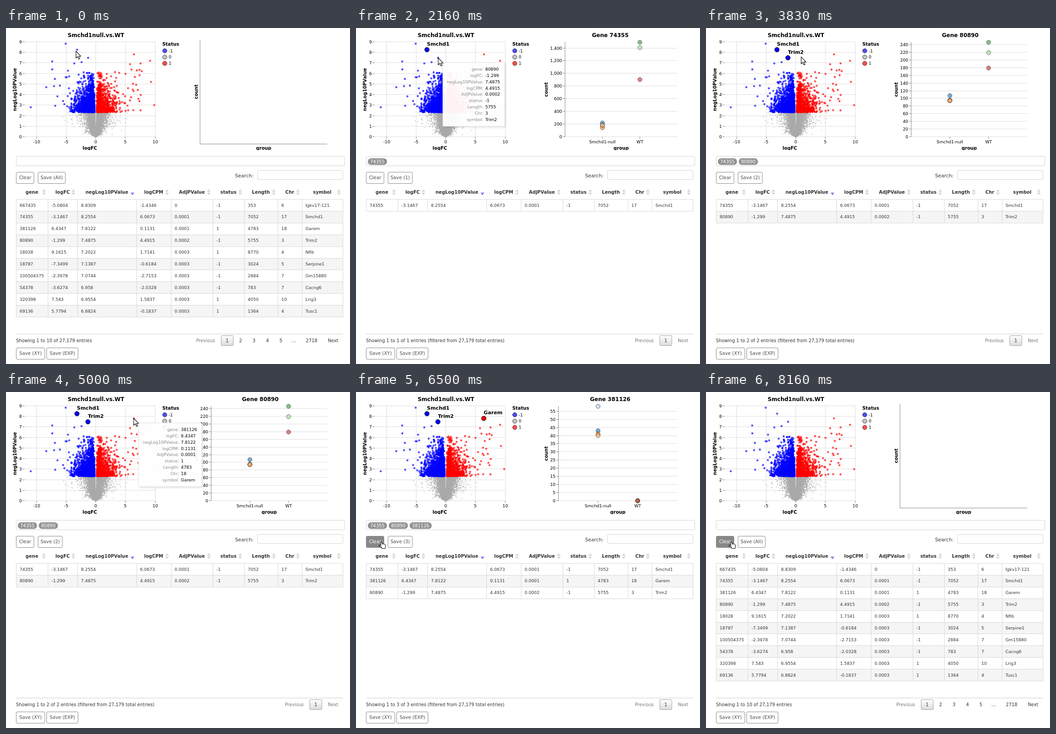
These frames come from a looping animation (757 px wide and 740 px high, 8330 ms). An HTML page with a canvas:

```html
<!DOCTYPE html>
<html lang="en">
<head>
<meta charset="utf-8">
<title>Volcano plot explorer</title>
<style>
html, body { margin: 0; width: 100%; height: 100%; overflow: hidden; background: #fff; }
canvas, svg { position: absolute; left: 0; top: 0; width: 757px; height: 740px; }
text { font-family: "DejaVu Sans", sans-serif; white-space: pre; }
#tip rect { filter: drop-shadow(2px 2px 2px rgba(0, 0, 0, .12)); }
</style>
</head>
<body>
<canvas id="dots" width="757" height="740"></canvas>
<svg viewBox="0 0 757 740">
  <defs>
    <linearGradient id="page" x2="0" y2="1"><stop stop-color="#fff"/><stop offset="1" stop-color="#dcdcdc"/></linearGradient>
  </defs>
  <g id="frame"></g>
  <g id="view"></g>
  <g id="clear"></g>
  <g id="tip"></g>
  <g id="arrow"><path d="M0 0V15.2L3.5 12L6 17.6L8.5 16.5L6.1 11.2H10.6Z" fill="#fff" stroke="#000" stroke-width="1.1"/></g>
  <g id="hand"><path d="M.5 1.5Q1.5-.5 3.3 1L5 5Q9 3.500 11.600 7L12 10.500L10.800 14.800H4.300L2.500 11.500L-2.500 8.800Q-2.500 7 0 7.500L2 8Z" fill="#fff" stroke="#000" stroke-width="1.1"/></g>
</svg>
<script>
const LOOP = 8330, STEP = 1000 / 6;
const $ = id => document.getElementById(id);

const COLS = ['gene', 'logFC', 'negLog10PValue', 'logCPM', 'AdjPValue', 'status', 'Length', 'Chr', 'symbol'];
const EDGES = [22, 92, 157, 287, 363, 455, 524, 598, 651, 741];
const GENES = `667435 -5.0804 8.8309 -1.4346 0 -1 353 6 Igkv17-121
74355 -3.1467 8.2554 6.0673 0.0001 -1 7052 17 Smchd1
381126 6.4347 7.8122 0.1131 0.0001 1 4783 18 Garem
80890 -1.299 7.4875 4.4915 0.0002 -1 5755 3 Trim2
18028 9.1615 7.2022 1.7141 0.0003 1 8770 4 Nfib
18787 -7.3499 7.1387 -0.6184 0.0003 -1 3024 5 Serpine1
100504375 -2.3978 7.0744 -2.7153 0.0003 -1 2884 7 Gm15880
54378 -3.6274 6.958 -2.0328 0.0003 -1 783 7 Cacng6
320398 7.543 6.9554 1.5837 0.0003 1 4050 10 Lrig3
69136 5.7794 6.8824 -0.1837 0.0003 1 1364 4 Tusc1
434401 0.6494 4.3982 5.6908 0.0037 1 387 9 Gm5616`.split('\n').map(l => l.split(' '));
const geneRow = id => GENES.find(g => g[0] === id);

// Four samples of the first group, then three of the second
const SAMPLES = ['#1f77b4', '#aec7e8', '#ff7f0e', '#ffbb78', '#2ca02c', '#98df8a', '#d62728'];
const CHARTS = {
  74355: { x: 460, step: 200, counts: [218, 184, 143, 181, 1490, 1405, 902] },
  80890: { x: 451.5, step: 20, counts: [107, 95, 94, 94, 246, 219, 179] },
  381126: { x: 445.5, step: 5, counts: [43, 58, 41, 40, 0, 0, 0] }
};

// Timeline: [ms, ...]; the cursor moves linearly between its keys
const CURSOR = [[0, 154, 51], [1500, 155, 50], [2160, 181, 66], [3500, 181, 66], [4660, 281, 58],
  [5660, 281, 58], [5830, 205, 135], [6000, 153, 205], [6500, 53, 330]];
const PICKED = [[0, []], [1330, ['74355']], [2660, ['74355', '80890']], [5330, ['74355', '80890', '381126']], [7160, []]];
const TIPS = [[0, null], [160, ['74355', 165, 60]], [1330, null], [2160, ['80890', 191, 76]], [2660, null],
  [4660, ['381126', 291.5, 68]], [5330, null], [5830, ['434401', 215.5, 145.5]], [6160, null]];
const HOVER = 6500;

const px = v => 197.6 + v * 13.05;
const py = v => 239.5 - v * 23.22;
const crisp = v => Math.floor(v) + .5;

function text(s, x, y, { size = 10, anchor = 'start', fill = '#333', bold, turn } = {}) {
  const rot = turn ? ` transform="rotate(-90 ${x} ${y})"` : '';
  return `<text x="${x}" y="${y + size * .36}" font-size="${size}" text-anchor="${anchor}" fill="${fill}"` +
    `${bold ? ' font-weight="700"' : ''}${rot}>${s}</text>`;
}
const mid = (s, x, y, o) => text(s, x, y, { anchor: 'middle', ...o });
const title = (s, x, y, size, turn) => mid(s, x, y, { size, turn, bold: true, fill: '#000' });
const label = (s, x, y, anchor) => text(s, x, y, { size: 9.3, anchor, fill: '#000' });
const line = (x1, y1, x2, y2, c) => `<path d="M${x1} ${y1}L${x2} ${y2}" stroke="${c}"/>`;
const box = (x, y, w, h, fill, stroke, r = 0) =>
  `<rect x="${x}" y="${y}" width="${w}" height="${h}" rx="${r}" fill="${fill}" stroke="${stroke}"/>`;
const disc = (x, y, r, fill, extra = '') => `<circle cx="${x}" cy="${y}" r="${r}" fill="${fill}" stroke="#000" ${extra}/>`;
const button = (s, x, y, w, hot) => box(x, y, w, 25, hot ? '#888' : '#fff', '#888', 2.5) +
  mid(s, x + w / 2, y + 12.3, { size: 10.2, fill: hot ? '#fff' : '#4c4c4c' });

function random(seed) {
  return () => (seed = (seed * 1664525 + 1013904223) % 4294967296) / 4294967296;
}

function drawDots() {
  const c = $('dots').getContext('2d'), rnd = random(77);
  const gauss = () => Math.sqrt(-2 * Math.log(1 - rnd())) * Math.cos(6.2832 * rnd());
  // Effect size that goes with a significance v: z score times a log-normal error
  const effect = (v, se, spread) => (Math.sqrt(.0424 + .868 * v) - .206) / .434 * se * Math.exp(spread * gauss());
  const dot = (x, v, r = 2.3) => { c.beginPath(); c.arc(px(x), py(v), r, 0, 7); c.fill(); };

  c.strokeStyle = '#ddd';
  c.beginPath();
  for (let v = -10; v <= 10; v += 5) { c.moveTo(crisp(px(v)), 30.5); c.lineTo(crisp(px(v)), 239.5); }
  for (let v = 0; v <= 9; v++) { c.moveTo(41, crisp(py(v))); c.lineTo(328, crisp(py(v))); }
  c.stroke();

  c.fillStyle = '#aaa';
  for (let i = 0; i < 9000; i++) {
    const v = 2.29 * Math.pow(rnd(), 1.25);
    const x = Math.max(effect(v, .24, .72), v > 1.4 ? .1 : 0);
    if (x < 9.6) dot(rnd() < .5 ? -x : x, v, .85);
  }

  const cloud = (n, side, se, spread, mean) => {
    while (n) {
      const v = 2.33 - mean * Math.log(1 - rnd());
      const x = Math.max(effect(v, se, spread), .2);
      if (v > 6.1 || x > 5.6 - v * .4) continue;
      dot(side * x, v);
      n--;
    }
  };
  const strays = (n, side, reach, bend) => {
    while (n--) dot(side * (2 + reach * Math.pow(rnd(), bend)), 2.4 + 4.2 * Math.pow(rnd(), 1.2));
  };
  const known = side => GENES.slice(0, 10).filter(g => g[5] == side).forEach(g => dot(+g[1], +g[2]));

  c.globalAlpha = .68;
  c.fillStyle = '#00f';
  cloud(950, -1, .19, .45, 1);
  cloud(650, -1, .62, .48, .62);
  strays(45, -1, 5.5, 2.4);
  known(-1);
  dot(-10.97, 2.8);
  dot(-8.35, 4.7);
  c.fillStyle = '#f00';
  cloud(700, 1, .15, .42, 1);
  cloud(420, 1, .48, .55, .62);
  strays(50, 1, 6, 1.2);
  known(1);
  dot(9.85, 3);
  dot(9.3, 5.2);
}

function frame() {
  let s = title('Smchd1null.vs.WT', 198, 15.2, 12) + title('negLog10PValue', 19, 135.5, 10.1, true) + title('logFC', 184.5, 264.6, 10.1);
  for (let v = 0; v <= 9; v++) {
    const y = crisp(py(v));
    s += label(v, 35, y, 'end') + line(36.5, y, 41, y, '#888');
  }
  for (let v = -10; v <= 10; v += 5) {
    const x = crisp(px(v));
    s += label(v, x, 250.8, 'middle') + line(x, 239.5, x, 244, '#888');
  }
  s += text('Status', 344, 35.3, { size: 10.1, bold: true, fill: '#000' });
  ['#4d4dff', '#c4c4c4', '#ff4d4d'].forEach((c, i) => {
    s += disc(349.4, 50.2 + i * 13.9, 4.7, c, 'stroke-opacity=".7"') + label(i - 1, 358, 50.2 + i * 13.9);
  });

  s += box(22.5, 282.5, 723, 21, '#fff', '#d4d4d4', 2.5) + box(553.5, 313.5, 188, 20, '#fff', '#d4d4d4', 2.5);
  s += text('Search:', 504, 325, { size: 10.8 });
  s += button('Save (XY)', 22.5, 704.5, 63) + button('Save (EXP)', 89.5, 704.5, 69);
  COLS.forEach((name, i) => {
    s += mid(name, (EDGES[i] + EDGES[i + 1]) / 2, 361.5, { bold: true });
    const x = EDGES[i + 1] - 8.7;
    s += i === 2 ? `<path d="M${x - 4} 362.5h8l-4 6z" fill="#7d7df0"/>`
      : `<path d="M${x - 4} 360.500h8l-4-5.500zM${x - 4} 362.500h8l-4 5.500z" fill="#d6d6d6"/>`;
  });
  return s + line(22, 674, 742, 674, '#ccc');
}

function countChart(id) {
  if (!id) {
    return line(427, 26, 427, 255.5, '#888') + line(427, 255.5, 707, 255.5, '#888') +
      title('count', 418, 140.5, 10.1, true) + title('group', 567, 264.6, 10.1);
  }
  const { x, step, counts } = CHARTS[id], max = Math.max(...counts);
  const at = v => 239.5 - v * 208 / max;
  let s = title('Gene ' + id, 559.5, 15.2, 12) + title('count', 418, 135.5, 10.1, true) + title('group', (x + 707) / 2, 264.6, 10.1);
  for (let v = 0; v <= max; v += step) {
    const y = crisp(at(v));
    s += line(x, y, 707, y, '#ddd') + line(x - 4.6, y, x, y, '#888') + label(v.toLocaleString('en-US'), x - 6.5, y, 'end');
  }
  s += line(x, 31, x, 239.5, '#888');
  const groupX = i => x + (707 - x) * (i + 1) / 3;
  ['Smchd1-null', 'WT'].forEach((name, i) => {
    s += line(groupX(i), 239.5, groupX(i), 244, '#888') + label(name, groupX(i), 250.8, 'middle');
  });
  counts.forEach((v, i) => s += disc(groupX(i < 4 ? 0 : 1), at(v), 4.6, SAMPLES[i], 'opacity=".6"'));
  return s;
}

function table(rows) {
  const rowY = r => 377 + r * 25.9, rule = r => line(22, Math.round(rowY(r)) + .5, 742, Math.round(rowY(r)) + .5, '#d8d8d8');
  let s = '';
  rows.forEach((row, r) => {
    if (r % 2) s += `<rect x="22" y="${rowY(r)}" width="720" height="25.900" fill="#f5f5f5"/>`;
    s += rule(r);
    row.forEach((t, i) => s += text(t, EDGES[i] + 8, rowY(r) + 13.2, { size: 9.4 }));
  });
  s += rule(rows.length);
  for (const x of EDGES) s += line(x + .5, 377, x + .5, rowY(rows.length), '#d8d8d8');
  return s;
}

function pager(full) {
  const x = full ? 473.5 : 668.5;
  let s = mid('Previous', x - 34, 688.5, { size: 9.8, fill: '#777' }) +
    box(x, 677.5, 26.5, 22, 'url(#page)', '#a0a0a0', 2) + mid(1, x + 13.2, 688.5) +
    mid('Next', 719.7, 688.5, { size: 9.8, fill: full ? '#333' : '#777' });
  if (full) {
    for (let i = 2; i <= 5; i++) s += mid(i, 457 + i * 29.6, 688.5);
    s += mid('…', 633, 688.5) + mid(2718, 672.5, 688.5);
  }
  return s;
}

function view(picked) {
  const n = picked.length;
  let s = '';
  for (const id of picked) {
    const g = geneRow(id), x = px(+g[1]), y = py(+g[2]);
    s += disc(x - .4, y, 5, g[5] > 0 ? '#f00' : '#00f') + text(g[8], x - .5, y - 13, { size: 11.1, bold: true, fill: '#000' });
  }
  s += countChart(picked[n - 1]) + '<rect y="269" width="757" height="12" fill="#fff"/>';
  let x = 26;
  for (const id of picked) {
    const w = id.length * 6.36 + 10.5;
    s += `<rect x="${x}" y="287" width="${w}" height="14.500" rx="7.200" fill="#929292"/>` + mid(id, x + w / 2, 294.3, { fill: '#fff' });
    x += w + 3.7;
  }
  s += n ? button(`Save (${n})`, 70.5, 317.5, 53.5) : button('Save (All)', 70.5, 317.5, 60);
  s += table(GENES.slice(0, 10).filter(g => !n || picked.includes(g[0])));
  s += text(n ? `Showing 1 to ${n} of ${n} entries (filtered from 27,179 total entries)` : 'Showing 1 to 10 of 27,179 entries',
    22, 688, { size: 9.83 });
  return s + pager(!n);
}

const pen = document.createElement('canvas').getContext('2d');
pen.font = '9.3px "DejaVu Sans", sans-serif';

function tooltip(tip) {
  if (!tip) return '';
  const [id, x, y] = tip, row = geneRow(id);
  const w = 104 + Math.max(...row.map(t => pen.measureText(t).width));
  let s = box(x, y, w, 140.5, 'rgba(255,255,255,.95)', '#e0e0e0', 3);
  COLS.forEach((name, i) => {
    const cy = y + 14.7 + i * 13.85;
    s += text(name + ':', x + 89.5, cy, { size: 9.3, anchor: 'end', fill: '#888' }) + text(row[i], x + 93.5, cy, { size: 9.3, fill: '#000' });
  });
  return s;
}

const current = (keys, t) => keys.filter(k => k[0] <= t).pop();

function cursorAt(t) {
  const a = current(CURSOR, t), b = CURSOR[CURSOR.indexOf(a) + 1];
  if (!b) return [a[1], a[2]];
  const f = (t - a[0]) / (b[0] - a[0]);
  return [a[1] + (b[1] - a[1]) * f, a[2] + (b[2] - a[2]) * f];
}

const shown = {};
function update(id, key, make) {
  if (shown[id] === key) return;
  shown[id] = key;
  $(id).innerHTML = make(key);
}

function render(now) {
  // The picture changes six times a second, on whole hundredths
  const tick = Math.floor((now % LOOP + 7) / STEP);
  const t = Math.floor(tick * STEP / 10 + .01) * 10 % LOOP;
  const hot = t >= HOVER, [x, y] = cursorAt(t);
  update('view', current(PICKED, t)[1], view);
  update('tip', current(TIPS, t)[1], tooltip);
  update('clear', hot, h => button('Clear', 22.5, 317.5, 39, h));
  for (const id of ['arrow', 'hand']) {
    $(id).setAttribute('transform', `translate(${x} ${y})`);
    $(id).style.display = (id === 'hand') === hot ? '' : 'none';
  }
}

drawDots();
$('frame').innerHTML = frame();
let start;
function loop(now) {
  start ??= now;
  render(now - start);
  requestAnimationFrame(loop);
}
render(0);
requestAnimationFrame(loop);
</script>
</body>
</html>
```
